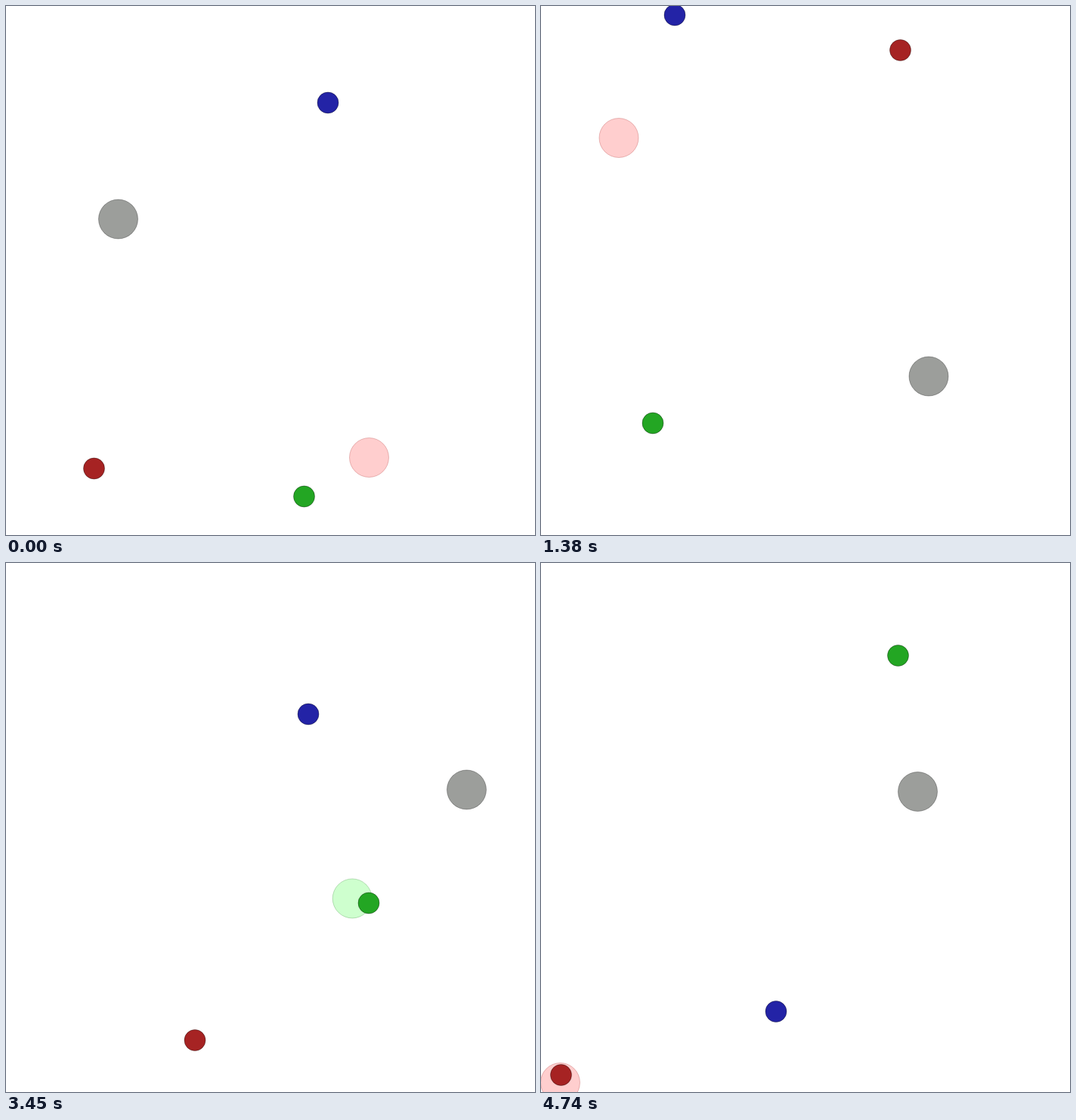
Recreate the animation shown at these times as an HTML page with a canvas. Size 700 px wide and 700 px high, loop 4.77 s.

```html
<!DOCTYPE html>
<html lang="en">
<head>
<meta charset="utf-8">
<title>Speaker and listener</title>
<style>
  html, body { margin: 0; width: 100%; height: 100%; overflow: hidden; background: #fff; }
  canvas { display: block; }
</style>
</head>
<body>
<canvas id="stage" width="700" height="700"></canvas>
<script>
const ctx = document.getElementById('stage').getContext('2d');
const STEP = 30, STEPS = 159;
const COLORS = { red: '#a62323', green: '#23a623', blue: '#2323a6' };
const TINTS = { red: '#ffcece', green: '#ceffce', blue: '#ceceff' };
const EDGES = { red: 'rgba(166,35,35,.27)', green: 'rgba(35,130,35,.27)', blue: 'rgba(35,35,166,.27)' };

// Each round: fixed speaker and landmarks, and a listener that travels to its goal.
// Path points are [step, x, y]; the goal is reached when the next round begins.
const rounds = [
  { goal: 'red', speaker: [148.5, 282], red: [116.5, 612], green: [394.5, 649], blue: [426, 128],
    path: [[0, 480.5, 597.5]] },
  { goal: 'blue', speaker: [240, 670.5], red: [80.5, 330], green: [531.5, 250], blue: [330, 420],
    path: [[11, 400, 180]] },
  { goal: 'red', speaker: [250.5, 409], red: [675, 486.5], green: [538, 290], blue: [111.5, 690.5],
    path: [[21, 422, 101.5]] },
  { goal: 'blue', speaker: [67.5, 360], red: [420, 500], green: [300, 690], blue: [180, 200],
    path: [[35, 450, 300]] },
  { goal: 'red', speaker: [513, 490], red: [475.5, 58.5], green: [148, 552], blue: [177, 12],
    path: [[43, 30.5, 215], [46, 103, 174.5]] },
  { goal: 'green', speaker: [66, 614.5], red: [242, 24], green: [566.5, 212], blue: [581.5, 123],
    path: [[57, 250, 480], [69, 555, 233], [72, 575.5, 216]] },
  { goal: 'blue', speaker: [107, 40.5], red: [169, 559], green: [229, 34.5], blue: [539.5, 15],
    path: [[73, 330, 560], [95, 529.5, 3.5]] },
  { goal: 'green', speaker: [609.5, 300], red: [250, 631.5], green: [480, 450], blue: [400, 200],
    path: [[97, 300, 400]] },
  { goal: 'blue', speaker: [187, 693.5], red: [350, 285.5], green: [190, 589], blue: [654, 231.5],
    path: [[120, 129.5, 51.5], [133, 624.5, 183]] },
  { goal: 'red', speaker: [498.5, 302.5], red: [26.5, 677.5], green: [472.5, 122.5], blue: [311, 593.5],
    path: [[135, 672.5, 91.5], [144, 413, 526], [158, 25.5, 687.5]] }
];
rounds.forEach((round, i) => {
  const end = i + 1 < rounds.length ? rounds[i + 1].path[0][0] : STEPS;
  round.start = round.path[0][0];
  round.path.push([end, ...round[round.goal]]);
});

// Hermite curve through the path points, at rest at both ends.
function locate(path, step) {
  let i = 0;
  while (i < path.length - 2 && step >= path[i + 1][0]) i++;
  const a = path[i], b = path[i + 1], span = b[0] - a[0], u = (step - a[0]) / span;
  const slope = (k, axis) => k === 0 || k === path.length - 1 ? 0 :
    (path[k + 1][axis] - path[k - 1][axis]) / (path[k + 1][0] - path[k - 1][0]);
  return [1, 2].map(axis =>
    a[axis] + (b[axis] - a[axis]) * u * u * (3 - 2 * u) +
    span * u * (1 - u) * ((1 - u) * slope(i, axis) - u * slope(i + 1, axis)));
}

function disc([x, y], radius, fill, edge) {
  ctx.beginPath();
  ctx.arc(x, y, radius, 0, 2 * Math.PI);
  ctx.fillStyle = fill;
  ctx.fill();
  ctx.strokeStyle = edge;
  ctx.stroke();
}

function draw() {
  const step = Math.floor(performance.now() / STEP) % STEPS;
  const round = rounds.findLast(r => r.start <= step);
  ctx.clearRect(0, 0, 700, 700);
  disc(round.speaker, 26, '#9c9e9b', 'rgba(0,0,0,.3)');
  disc(locate(round.path, step), 26, TINTS[round.goal], EDGES[round.goal]);
  for (const name in COLORS) disc(round[name], 14, COLORS[name], 'rgba(0,0,0,.35)');
  requestAnimationFrame(draw);
}
draw();
</script>
</body>
</html>
```
